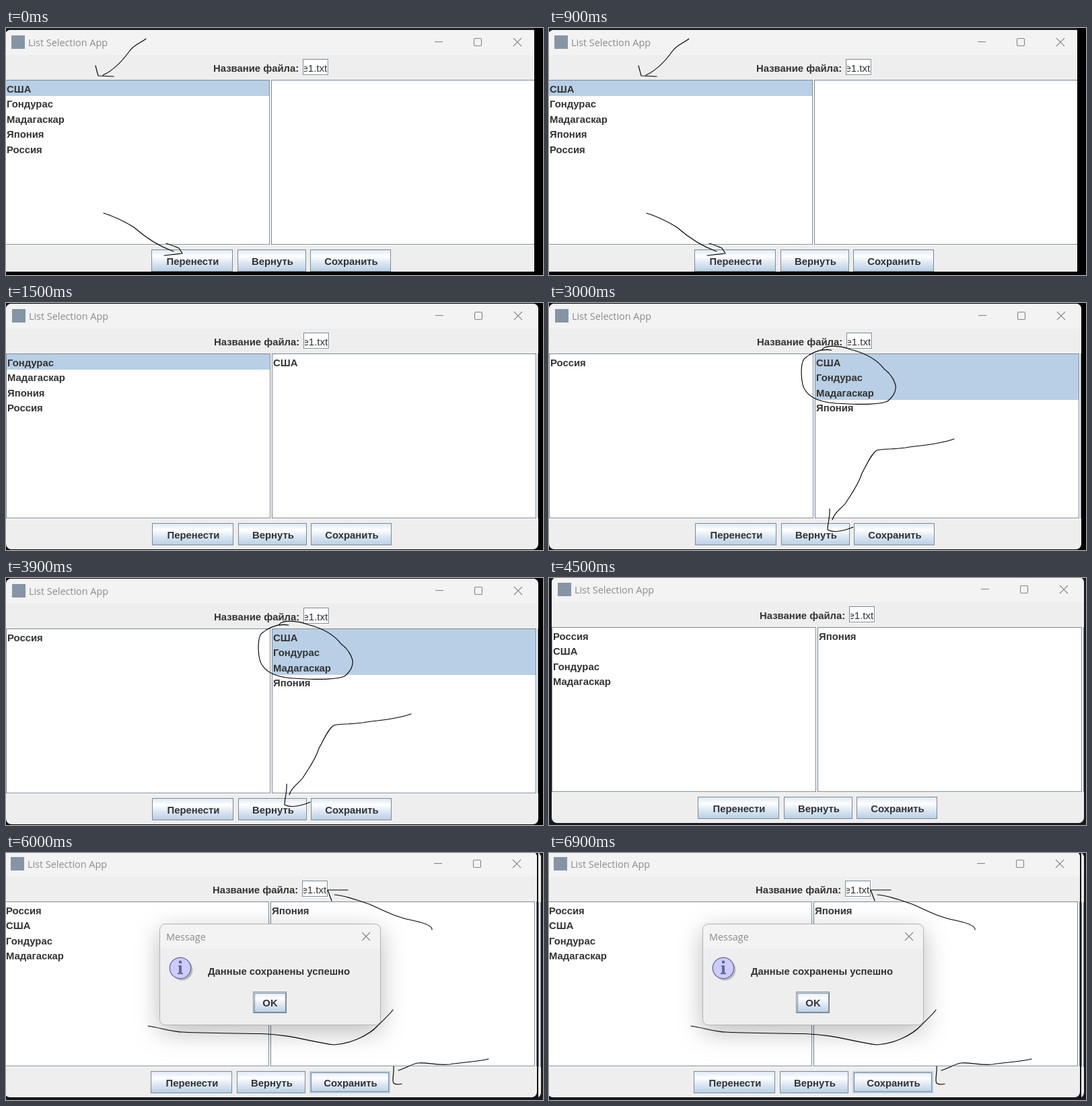
These frames come from a looping animation (798x367 px, 7500 ms). An HTML page:

```html
<!DOCTYPE html>
<html lang="ru">
<head>
<meta charset="utf-8">
<title>List Selection App</title>
<style>
  html, body { margin: 0; width: 100%; height: 100%; overflow: hidden; background: #000; }
  #stage { display: block; width: 798px; height: 367px; }
  text { font: 15px "Liberation Sans", Arial, sans-serif; fill: #333; white-space: pre; }
  .bold { font-weight: 700; font-size: 14.85px; }
  .title { font: 14.4px "Open Sans", "Noto Sans", sans-serif; fill: #8b8b8b; }
  .mid { text-anchor: middle; }
  .icon { fill: none; stroke: #858585; stroke-width: 1.1; }
  .edge { stroke: #7a8a99; }
  .pen { fill: none; stroke: #000; stroke-width: 1.15; stroke-linecap: round; stroke-linejoin: round; }
  .dialog { filter: drop-shadow(0 10px 18px rgba(0, 0, 0, .27)); }
</style>
</head>
<body>
<svg id="stage" viewBox="0 0 798 367">
  <defs>
    <linearGradient id="metal" x2="0" y2="1">
      <stop stop-color="#dde8f3"/>
      <stop offset=".3" stop-color="#fff"/>
      <stop offset=".6" stop-color="#dde8f3"/>
      <stop offset="1" stop-color="#b8cfe5"/>
    </linearGradient>
  </defs>
</svg>
<script>
const STEP = 1500;
const ROW = 22.5;
const stage = document.getElementById('stage');

const rect = (x, y, w, h, fill, more = '') =>
  `<rect x="${x}" y="${y}" width="${w}" height="${h}" fill="${fill}" ${more}/>`;
const label = (x, y, text, cls = 'bold') => `<text x="${x}" y="${y}" class="${cls}">${text}</text>`;
const box = (x, y, w, h, fill) => rect(x + .5, y + .5, w - 1, h - 1, fill, 'class="edge"');
// Sunken frame: dark outline with a white line along the right and bottom.
const inset = (x, y, w, h) => rect(x, y, w + 1, h + 1, '#fff') + box(x, y, w, h, '#fff');
const crop = (x, y, w, h, body) =>
  `<svg x="${x}" y="${y}" width="${w}" height="${h}" overflow="hidden">${body}</svg>`;
const cross = (x, y) => `<path class="icon" d="M${x} ${y}l12 12m0-12l-12 12"/>`;
const pen = d => `<path class="pen" d="${d}"/>`;

function button(x, y, w, h, text, hover) {
  const frame = hover
    ? rect(x + 1, y + 1, w - 2, h - 2, 'url(#metal)', 'stroke="#b8cfe5" stroke-width="2"') +
      box(x + 2, y + 2, w - 4, h - 4, 'none')
    : box(x, y, w, h, 'url(#metal)');
  return frame + label(x + w / 2 + 1, y + 23, text, 'bold mid');
}

function list(x, items, selected) {
  return inset(x, 75, 393, 245) +
    (selected ? rect(x + 1, 76, 391, selected * ROW + .5, '#b8cfe5') : '') +
    items.map((item, i) => label(x + 2, 94 + Math.round(i * ROW - .1), item)).join('');
}

function appWindow({ dx, dy, left, right, pick = [0, 0], saved }) {
  return `<g transform="translate(${dx} ${dy})">` +
    rect(0, 1, 791, 365, '#eee', 'rx="8"') +
    `<path fill="#f3f3f3" d="M0 38V9a8 8 0 0 1 8-8H783a8 8 0 0 1 8 8V38z"/>` +
    rect(9, 9, 20, 20, '#8595a5') +
    label(34, 25, 'List Selection App', 'title') +
    `<path class="icon" d="M638 18.5h12"/>` +
    rect(696.5, 13.5, 11, 11, 'none', 'rx="1.5" class="icon"') + cross(755, 13) +
    label(309, 63, 'Название файла:') +
    inset(442, 44, 38, 24) +
    crop(444, 46, 34, 21, label(-2.5, 17, 'e1.txt', '')) +
    list(0, left, pick[0]) + list(395, right, pick[1]) +
    `<path class="edge" d="M790.5 75V320"/>` +
    button(217, 327, 121, 33, 'Перенести') +
    button(345, 327, 102, 33, 'Вернуть') +
    button(453, 327, 120, 33, 'Сохранить', saved) + '</g>';
}

function dialog() {
  return `<g class="dialog">` + rect(228.5, 105.5, 328, 150, '#eee', 'rx="8"') + '</g>' +
    `<path fill="#f3f3f3" d="M229 142V114a8 8 0 0 1 8-8H548a8 8 0 0 1 8 8V142z"/>` +
    rect(228.5, 105.5, 328, 150, 'none', 'rx="8" stroke="#b2b2b2"') +
    label(238, 130, 'Message', 'title') + cross(529, 118) +
    `<circle cx="261.5" cy="173.5" r="16" fill="#bcbcc4"/>` +
    `<circle cx="259" cy="171" r="15.7" fill="#ccccff" stroke="#666699" stroke-width="1.3"/>` +
    `<path fill="#666699" d="M257 160h4v4h-4zM256 167h5v11h2v2h-8v-2h2v-9h-1z"/>` +
    label(300, 181, 'Данные сохранены успешно') +
    box(367, 206, 50, 32, 'url(#metal)') +
    box(369, 208, 47, 29, 'none') +
    label(392.5, 228, 'OK', 'bold mid');
}

const [usa, hon, mad, jap, rus] = ['США', 'Гондурас', 'Мадагаскар', 'Япония', 'Россия'];

const toList = '<path class="pen" style="stroke:#fff" d="M184 35C175 45 165 53 157 66"/>' +
  pen('M208 16C199 23 190 25 183 35C172 50 160 63 144 70M133 56L137 71L160 72');
const toMove = pen('M145 275C164 281 177 288 190 296C207 311 226 324 249 332M238 320Q250 324 257 327L262 335L235 338');
const lasso = pen('M420 70C400 67 387 76 379 83C373 92 374 121 381 130C390 144 410 149 436 149.5' +
  'C462 151 491 151 503 146C513 138 516 129 515 122C512 112 505 103 498 98C486 82 468 74 448 69C432 63 411 62 406 69');
const toReturn = pen('M602 202C577 211 553 211 530 215C510 218 496 216 487 219C478 225 472 241 465 253' +
  'C460 270 449 284 441 297C434 306 424 311 421 322M417 306C418 318 414 327 414 337C424 342 440 338 452 333');
const toField = pen('M633 114C634 108 621 104 608 101C580 96 562 86 540 76C522 70 508 64 488 62M508 55L478 55L484 71');
const underline = pen('M211 257C232 260 240 265 262 266C300 268 340 268 379 268.5' +
  'C424 270 446 279 487 285C512 284 540 270 552 257C562 247 570 240 575 233');
const toSave = pen('M717 306C697 311 676 311 660 314C641 316 627 311 613 312C603 313 594 320 583 323' +
  'M576 317C577 328 573 337 576 342Q580 345 588 343');

const back = fill => rect(0, 0, 798, 367, fill);
const returned = appWindow({ dx: 4, dy: -2, left: [rus, usa, hon, mad], right: [jap] });

const scenes = [
  back('#000') + crop(0, 0, 785, 362, rect(0, 0, 785, 12, '#1d1e22') +
    appWindow({ dx: -1, dy: 2, left: [usa, hon, mad, jap, rus], right: [], pick: [1, 0] })) +
    toList + toMove,
  back('#000') + appWindow({ dx: 0, dy: 0, left: [hon, mad, jap, rus], right: [usa], pick: [1, 0] }),
  back('#000') + appWindow({ dx: 0, dy: 0, left: [rus], right: [usa, hon, mad, jap], pick: [0, 3] }) +
    lasso + toReturn,
  back('#1b1a1e') + returned,
  back('#1b1a1e') + returned + crop(0, 0, 791, 365, back('#151518') +
    appWindow({ dx: -2, dy: -3, left: [rus, usa, hon, mad], right: [jap], saved: true }) +
    dialog() + toField + underline + toSave)
];

stage.insertAdjacentHTML('beforeend', scenes.map(s => `<g class="scene" display="none">${s}</g>`).join(''));
const groups = [...stage.querySelectorAll('.scene')];
const start = performance.now();
let shown = -1;

function draw(now) {
  const next = Math.floor(Math.max(0, now - start) / STEP) % groups.length;
  if (next !== shown) {
    groups.forEach((g, i) => g.setAttribute('display', i === next ? 'inline' : 'none'));
    shown = next;
  }
  requestAnimationFrame(draw);
}
draw(start);
</script>
</body>
</html>
```
